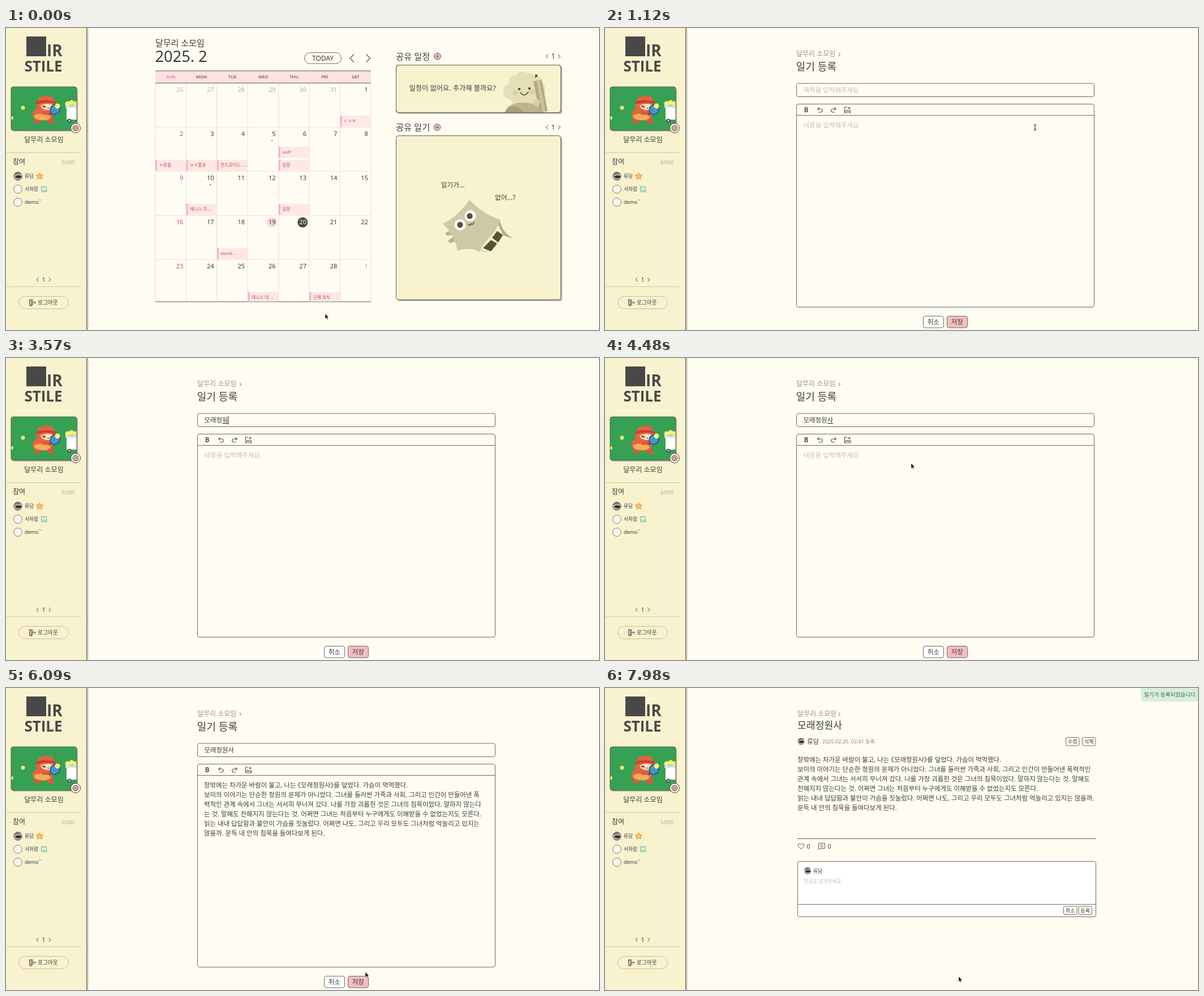
An HTML page for the animation above (8000 ms loop, 1048 by 534 pixels).

```html
<!DOCTYPE html>
<html lang="ko">
<head>
<meta charset="utf-8">
<title>Shared diary</title>
<style>
html, body { margin: 0; width: 100%; height: 100%; overflow: hidden; background: #fffdf2; }
svg { display: block; }
text { font-family: "Noto Sans", "Noto Sans CJK KR", "Noto Sans CJK", sans-serif; fill: #3c3c3c; white-space: pre; }
.logo { font-family: "Open Sans", sans-serif; font-weight: 700; font-stretch: 75%; fill: #484848; }
.mid { text-anchor: middle; }
.end { text-anchor: end; }
.soft { fill: #98958a; }
.hint { fill: #c3c0b6; }
.bold { font-weight: 500; }
.s87 { font-size: 8.7px; }
.s9 { font-size: 9px; }
.s115 { font-size: 11.5px; }
.s12 { font-size: 12px; }
.body text { font-size: 11.45px; font-weight: 500; font-feature-settings: "halt"; }
.line { fill: none; stroke: #5c5b57; stroke-width: 1; }
.thin { fill: none; stroke: #8c8977; stroke-width: 1.1; }
.rule { stroke: #cfc9a9; }
.box { fill: #fffdf2; stroke: #6c6b67; stroke-width: 1; }
.white { fill: #fff; }
.card { fill: #f8f2ce; stroke: #5c5b57; stroke-width: 1; }
.shade { fill: #bdb9a2; }
.grid { fill: none; stroke: #fbdad7; stroke-width: 1.2; }
.red { fill: #c94a45; }
</style>
</head>
<body>
<svg width="1048" height="534" viewBox="0 0 1048 534">
<defs>
  <linearGradient id="edge"><stop stop-color="#a9a699"/><stop offset="1" stop-color="#fffdf2"/></linearGradient>
  <clipPath id="round"><circle r="7.5"/></clipPath>
  <clipPath id="photo"><rect x="9" y="104" width="116" height="77" rx="4"/></clipPath>
  <clipPath id="note"><rect x="690" y="66" width="290" height="83.5" rx="4"/></clipPath>
  <g id="face" clip-path="url(#round)">
    <circle r="8" fill="#b4b2ac"/>
    <path d="M-8 -8H8V-3Q1 -6 -8 -1Z" fill="#77756f"/>
    <ellipse cx="1" cy="1" rx="5.5" ry="2.4" fill="#2f2e2c"/>
    <path d="M-8 4H8V8H-8Z" fill="#9d9b94"/>
  </g>
  <g id="blank"><circle r="7.3" fill="#fff" stroke="#77756a"/><circle r="5.6" fill="#f6f5f1"/></g>
  <g id="plus"><circle r="5.8" fill="#f3bfc3" stroke="#5a4a4a"/><path class="line" d="M-3.2 0H3.2M0 -3.2V3.2"/></g>
  <path id="pager" class="thin" d="M-9 -3.5L-12.5 0L-9 3.5M9 -3.5L12.5 0L9 3.5"/>
</defs>

<rect width="1048" height="534" fill="#fffdf2"/>

<g id="sidebar">
  <rect x="142" width="5" height="534" fill="url(#edge)"/>
  <rect width="142" height="534" fill="#f8f2ce"/>
  <path class="line" d="M142.7 0V534"/>
  <rect x="36" y="15" width="35" height="35" fill="#484848"/>
  <text class="logo" x="72" y="50" font-size="28">IR</text>
  <text class="logo mid" x="66" y="77" font-size="26">STILE</text>

  <rect class="shade" x="11" y="106" width="116" height="77" rx="4"/>
  <g clip-path="url(#photo)">
    <rect x="9" y="104" width="116" height="77" fill="#36a153"/>
    <g fill="#f4f277">
      <circle cx="30" cy="141" r="3.4"/><circle cx="10" cy="159" r="3"/>
      <circle cx="109" cy="134" r="4.5"/><circle cx="116" cy="132" r="4.5"/><circle cx="123" cy="134" r="4.5"/>
    </g>
    <rect x="105" y="137" width="21" height="4" fill="#cfe4ee"/>
    <rect x="107" y="141" width="18" height="21" fill="#fff"/>
    <circle cx="112" cy="164" r="3.6" fill="#4b5560"/><circle cx="112" cy="164" r="1.4" fill="#ddd"/>
    <path d="M53 158L48 168H60L62 160ZM72 160L75 169H86L80 157Z" fill="#e2553b"/>
    <path d="M54 143Q45 149 47 157Q52 164 66 164Q81 164 83 155L80 142Z" fill="#e9613f"/>
    <path d="M50 154Q60 149 76 154L79 158Q76 163 66 163Q54 163 50 158Z" fill="#f5ad58"/>
    <g fill="#e9613f">
      <circle cx="62" cy="127" r="5.5"/><circle cx="70" cy="125" r="5.5"/><circle cx="78" cy="126" r="5.5"/>
      <ellipse cx="72" cy="137" rx="19" ry="11"/>
    </g>
    <path d="M55 130Q70 125 87 130L89 134Q71 129 53 135Z" fill="#c9402f"/>
    <path d="M61 137Q73 131 86 137Q86 145 74 145Q63 145 61 137Z" fill="#fbe3c0"/>
    <path d="M63 138Q68 135 71 140Q66 142 63 138ZM78 140Q81 135 85 138Q83 142 78 140Z" fill="#8a5236"/>
    <path d="M73 141Q75 143.500 77 141" fill="none" stroke="#5a3526"/>
    <path d="M66 151L78 151" stroke="#e2553b" stroke-width="5" stroke-linecap="round"/>
    <path d="M76 153L82 149" stroke="#2b4f7c" stroke-width="2"/>
    <ellipse cx="87" cy="144" rx="9.500" ry="8" transform="rotate(-50 87 144)" fill="#4aa0d0" stroke="#1f5c93" stroke-width="2"/>
    <path d="M81 143L91 150M84 139L94 146M81 149L91 138M86 152L95 142" stroke="#2a6fa6" stroke-width=".7"/>
    <circle cx="91" cy="138" r="4.6" fill="#f4f277"/>
  </g>
  <rect class="line" x="9" y="104" width="116" height="77" rx="4"/>
  <circle cx="123" cy="177" r="8.5" fill="#f8efd4" stroke="#4a4a4a"/>
  <circle cx="123" cy="177" r="4.6" fill="#f3bfc3" stroke="#6a4b4b" stroke-width="1.2"/>
  <circle cx="123" cy="177" r="1.8" fill="#f8efd4" stroke="#6a4b4b"/>

  <text class="s12 mid" x="67" y="202">달무리 소모임</text>
  <path class="rule" d="M1 220.5H132M1 457.5H132"/>
  <text class="s12" x="12" y="241">참여</text>
  <text class="s9 end" x="121.5" y="240.5" style="fill:#b5b093">3/000</text>
  <use href="#face" x="21" y="262"/><circle class="line" cx="21" cy="262" r="7.3" style="stroke:#77756a"/>
  <use href="#blank" x="21" y="285"/><use href="#blank" x="21" y="308"/>
  <g class="bold">
    <text class="s87" x="33" y="265">류담</text>
    <text class="s87" x="33" y="288.3">서하람</text>
    <text class="s9" x="33" y="311">demo``</text>
  </g>
  <path d="M59.5 256L61.5 259.500L65.500 260L62.700 263L63.500 267L59.500 265L55.500 267L56.300 263L53.500 260L57.500 259.500Z" fill="#f3ae55" stroke="#f3ae55" stroke-width="1.500" stroke-linejoin="round"/>
  <circle cx="59.5" cy="262" r="2" fill="#f9d58a"/>
  <path d="M62 280.5L71 280L72.5 289.5L63 290Z" fill="#b5dfbd" stroke="#7fb893" stroke-width=".8"/>
  <circle cx="65.5" cy="284" r="1.5" fill="#fff"/><circle cx="69" cy="284" r="1.5" fill="#fff"/>
  <use href="#pager" x="66.5" y="445"/><text class="mid" x="66.5" y="449" font-size="10.5">1</text>
  <rect x="22.5" y="474.5" width="88" height="22" rx="11" fill="none" stroke="#c3bd9d"/>
  <path d="M41.5 480.5H47V490H41.5ZM41.5 480.5L45 482.5V492L41.5 490Z" fill="#f3bfc3" stroke="#5a4a4a" stroke-width=".9"/>
  <path class="line" d="M46.5 485.5H52M49.7 483L52.2 485.5L49.7 488"/>
  <text x="56" y="489" font-size="9.7">로그아웃</text>
</g>

<g id="calendar">
  <text x="264" y="32" font-size="15">달무리 소모임</text>
  <text x="263.5" y="60" font-size="27.2">2025. 2</text>
  <rect class="box" x="527.5" y="43.5" width="65" height="19.5" rx="9.7"/>
  <text class="s12 mid" x="560" y="57.5">TODAY</text>
  <path class="line" style="stroke-width:1.3" d="M615 46.5L608 53.5L615 60.5M636.5 46.5L643.5 53.5L636.5 60.5"/>
  <g id="days"></g>

  <text x="689" y="56" font-size="15.3">공유 일정</text>
  <use href="#plus" x="762.5" y="50"/>
  <use href="#pager" x="967" y="50"/><text class="mid s12" x="967" y="54.3">1</text>
  <rect class="shade" x="692" y="68" width="291" height="84" rx="4"/>
  <rect class="card" x="689.5" y="65.5" width="291" height="84" rx="4"/>
  <text x="712.5" y="111.3" font-size="12.25">일정이 없어요. 추가해 볼까요?</text>
  <g clip-path="url(#note)">
    <path d="M893 127Q878 124 879 111Q879 101 889 99Q888 83 902 83Q910 72 920 80Q935 77 936 91Q952 93 953 107Q953 122 938 124L934 140H896Z" fill="#e4deb9"/>
    <circle cx="900" cy="114" r="4.5" fill="#d6cfa6"/><circle cx="930" cy="113" r="4.5" fill="#d6cfa6"/>
    <circle cx="907" cy="108" r="2.2" fill="#55513a"/><circle cx="925" cy="107" r="2.2" fill="#55513a"/>
    <path d="M909 114Q916 123 923 113" fill="none" stroke="#55513a" stroke-width="1.6" stroke-linecap="round"/>
    <path d="M881 150Q888 131 915 132Q940 132 950 150Z" fill="#bcb48b"/>
    <path d="M886 141Q904 133 915 150H882Z" fill="#a79f76"/>
    <path d="M932 94L947 91L957 147L943 150Z" fill="#b3ab82"/>
    <path d="M938 93L943 92L953 148L948 149Z" fill="#cbc49c"/>
    <path d="M932 94L937 82L947 91Z" fill="#e4deb9"/>
    <path d="M934.5 88L936 81L940.5 85Z" fill="#4d4a38"/>
    <path d="M930 133Q931 125 940 126Q947 129 942 136Q934 139 930 133Z" fill="#d6cfa6"/>
  </g>
  <rect class="line" x="689.5" y="65.5" width="291" height="84" rx="4"/>

  <text x="689" y="181" font-size="15.3">공유 일기</text>
  <use href="#plus" x="762" y="175.5"/>
  <use href="#pager" x="967" y="175.5"/><text class="mid s12" x="967" y="179.8">1</text>
  <rect class="shade" x="692" y="193" width="291" height="290" rx="4"/>
  <rect class="card" x="689.5" y="190.5" width="291" height="290" rx="4"/>
  <g class="bold" font-size="11.8"><text x="768.5" y="282">일기가...</text><text x="864" y="304">없어...?</text></g>
  <path d="M790 357L776 362L779 367L788 366M793 367L781 376L785 381L796 376" fill="#bcb48b"/>
  <path d="M872 338Q877 363 897 372Q881 370 867 358" fill="#b5ad85"/>
  <path d="M866 340L879 366L849 396L832 392Z" fill="#f3edc8" stroke="#c9c29b"/>
  <path d="M868 359L878 366L870 379L859 371ZM857 375L868 381L857 395L843 389Z" fill="#55513a"/>
  <path d="M819 304Q842 328 873 339Q868 358 854 371Q842 383 837 396Q821 386 798 394Q793 366 772 346Q799 333 819 304Z" fill="#d0c9a5"/>
  <g fill="#fff"><circle cx="820.5" cy="332" r="10"/><circle cx="802.5" cy="348" r="10"/></g>
  <g fill="#55513a"><circle cx="819.5" cy="332.5" r="5.2"/><circle cx="802.5" cy="348" r="5.2"/></g>
  <path d="M817 347Q819 351 822 346Q826 349 827 343" fill="none" stroke="#55513a" stroke-width="1.6" stroke-linecap="round"/>
</g>

<g id="form">
  <text class="s12 soft" x="338" y="50">달무리 소모임</text>
  <path class="thin" d="M413 43.5L415.5 46.5L413 49.5"/>
  <text x="337.5" y="75" font-size="18.2">일기 등록</text>
  <rect class="box" x="338.5" y="98" width="526" height="23.5" rx="3.5"/>
  <text id="titleHint" class="s115 hint" x="350.5" y="114">제목을 입력해주세요</text>
  <text id="title" class="bold" x="350.5" y="114" font-size="11.45"></text>
  <rect class="box" x="338.5" y="134.5" width="526" height="359" rx="3.5"/>
  <path class="box" d="M338.5 154.5H864.5"/>
  <text class="mid" x="355.5" y="149" font-size="11.5" font-weight="700" style="fill:#555">B</text>
  <g class="line" style="stroke-width:1.2">
    <path d="M378.5 140.5L375.8 143L378.5 145.5M375.8 143H381.5Q384.3 143.5 384.3 146Q384 149 381 149H377.5"/>
    <path d="M405.5 140.5L408.2 143L405.5 145.5M408.2 143H402.5Q399.7 143.5 399.7 146Q400 149 403 149H406.5"/>
    <path d="M428.5 140H423.5V150H433.5V145M431.5 139.5V144M429.3 141.7H433.8M424.5 148.5L427 145.5L429 147.5L430.5 146L432.5 148.5"/>
  </g>
  <text id="bodyHint" class="s115 hint" x="350.5" y="176">내용을 입력해주세요</text>
  <g id="draft" class="body"></g>
  <path id="caret" stroke="#333"/>
  <rect class="box white" x="562.5" y="509.5" width="36" height="20.5" rx="3.5"/>
  <rect class="box" x="604.5" y="509.5" width="36" height="20.5" rx="3.5" style="fill:#f4bdc1"/>
  <g class="mid s115 bold"><text x="580.3" y="524">취소</text><text x="622.3" y="524">저장</text></g>
</g>

<g id="detail">
  <text class="s12 soft" x="340" y="50">달무리 소모임</text>
  <path class="thin" d="M413 43.5L415.5 46.5L413 49.5"/>
  <text class="bold" x="340" y="71.5" font-size="17.2">모래정원사</text>
  <use href="#face" transform="translate(346.5 94.5) scale(.83)"/>
  <text class="s115 bold" x="357" y="98.5">류담</text>
  <text class="s9" x="384" y="98" style="fill:#8b887e">2025.02.20. 02:41 등록</text>
  <g id="post" class="body"></g>
  <path class="line" d="M340 266.5H867.5"/>
  <path class="line" d="M346.5 284.5Q341 281 341 278Q341 275.3 343.5 275.3Q345.5 275.3 346.5 277.3Q347.5 275.3 349.5 275.3Q352 275.3 352 278Q352 281 346.5 284.5Z"/>
  <path class="line" d="M377.5 274.5H388.5V283.5H380L377.5 286ZM380 277.5H386M380 280.5H386"/>
  <g class="bold" font-size="10.5"><text x="356.5" y="283.5">0</text><text x="393.5" y="283.5">0</text></g>
  <rect class="box white" x="340.5" y="306.5" width="527" height="98" rx="3"/>
  <path class="box" d="M340.5 382.5H867.5"/>
  <use href="#face" transform="translate(358 323.3) scale(.83)"/>
  <text class="s87 bold" x="368" y="326.5">류담</text>
  <text class="s87 hint" x="351" y="344.5">댓글을 남겨보세요.</text>
  <g id="buttons"></g>
</g>

<g id="toast">
  <path d="M952 0H1060V24H952Q947 24 947 19V5Q947 0 952 0Z" fill="#d8eedb"/>
  <text x="952.5" y="15.3" font-size="9.6" style="fill:#3c6650">일기가 등록되었습니다.</text>
</g>

<path id="arrow" d="M0 0V9.5L2.2 7.6L3.6 10.8L5 10.2L3.6 7.1H6.4Z" fill="#000" stroke="#fff" stroke-width=".6"/>
<path id="beam" d="M-2.5 -5Q0 -5 0 -3V3Q0 5 -2.5 5M2.5 -5Q0 -5 0 -3M0 3Q0 5 2.5 5M-1 1.5H1" fill="none" stroke="#222"/>
</svg>

<script>
const $ = id => document.getElementById(id);
const text = (x, y, str, attrs = '') => `<text x="${x}" y="${y}" ${attrs}>${str}</text>`;
const rect = (x, y, w, h, fill) => `<rect x="${x}" y="${y}" width="${w}" height="${h}" fill="${fill}"/>`;
const circle = (x, y, r, fill) => `<circle cx="${x}" cy="${y}" r="${r}" fill="${fill}"/>`;

function dayColor(n, col) {
  if (n === 20) return '#fff';
  if (n < 1 && col === 0) return '#e8aaa5';
  if (n < 1 || n > 28) return '#b3b0a7';
  return col ? '#3c3c3c' : '#c94a45';
}

function buildCalendar() {
  const left = 264, top = 97.5, colW = 381 / 7, rowH = 78, bottom = 484;
  const colX = c => left + c * colW;
  let out = rect(left, 76, 381, 21, '#fce2e1');
  for (let c = 0; c <= 7; c++) out += `<path class="grid" d="M${colX(c)} ${top}V${bottom}"/>`;
  for (let r = 1; r < 5; r++) out += `<path class="grid" d="M${left} ${top + r * rowH}H645"/>`;
  out += `<path class="line" d="M${left} 75.8H645M${left} 97.3H645M${left} ${bottom}H645"/>`;
  'SUN MON TUE WED THU FRI SAT'.split(' ').forEach((day, c) => {
    out += text(colX(c + .5), 89.2, day, `class="mid" font-size="7.9" ${c ? '' : 'style="fill:#e2574d"'}`);
  });
  out += circle(470, 343.7, 9, '#fad8d5') + circle(524.3, 343.7, 9, '#444');
  out += circle(470, 199, 1.3, '#e0686a') + circle(361, 277.3, 1.3, '#e0686a');
  for (let i = 0; i < 35; i++) {
    const c = i % 7, r = Math.floor(i / 7), n = i - 5;
    const day = n < 1 ? n + 31 : n > 28 ? n - 28 : n;
    out += text(colX(c + 1) - 5.2, top + r * rowH + 15.6, day,
      `class="end" font-size="11" style="fill:${dayColor(n, c)}"`);
  }
  const events = [
    [6, 0, 'ㄴㅇㄹ'], [0, 1, 'ㅇ류율'], [1, 1, 'ㅠㅈ률츄'], [2, 1, '안드로이드 ...'], [4, 1, 'asdf', -23], [4, 1, '일정'],
    [1, 2, '테니스 치 ...'], [4, 2, '일정'], [2, 3, 'dscsd ...'], [3, 4, '테니스 대 ...'], [5, 4, '단체 회식']
  ];
  for (const [c, r, name, dy = 0] of events) {
    const x = colX(c), y = top + r * rowH + 57.5 + dy, h = r === 4 ? 16.5 : 19.5;
    out += rect(x, y, colW - .5, h, '#fce8e4') + rect(x, y, 3, h, '#f2b8bb');
    out += text(x + 6.5, y + 12.4, name, 'class="red bold" font-size="7.7"');
  }
  $('days').innerHTML = out;
}

// "|" breaks a line in the editor, "/" in the finished post, "\n" in both.
const entry = `창밖에는 차가운 바람이 불고, 나는 《모래정원사》를 덮었다. 가슴이 먹먹했다.
보미의 이야기는 단순한 정원의 문제가 아니었다. 그녀를 둘러싼 가족과 사회, 그리고 인간이 만들어낸 폭|력적인/ 관계 속에서 그녀는 서서히 무너져 갔다. 나를 가장 괴롭힌 것은 그녀의 침묵이었다. 말하지 않는다|는 것. 말해도/ 전해지지 않는다는 것. 어쩌면 그녀는 처음부터 누구에게도 이해받을 수 없었는지도 모른다.
읽는 내내 답답함과 불안이 가슴을 짓눌렀다. 어쩌면 나도, 그리고 우리 모두도 그녀처럼 억눌리고 있지는| 않을까./ 문득 내 안의 침묵을 들여다보게 된다.`;

const layout = (x, y, keep, drop) => entry.replaceAll(drop, '').split(new RegExp(`[\\n${keep}]`))
  .map((line, i) => text(x, y + i * 17, line.trim())).join('');

buildCalendar();
$('draft').innerHTML = layout(350, 176, '|', '/');
$('post').innerHTML = layout(340, 131, '/', '|');
$('buttons').innerHTML = [[814.5, 87.5, '수정'], [843.5, 87.5, '삭제'], [810.5, 386, '취소'], [837, 386, '등록']]
  .map(([x, y, label]) => `<rect class="box" x="${x}" y="${y}" width="23.5" height="14.5" rx="2.5"/>`
    + text(x + 11.8, y + 10.6, label, 'class="mid s9 bold"')).join('');

const typing = [
  [2730, 'ㅁ'], [2800, '모'], [2870, '몰'], [3010, '모래'], [3150, '모랮'], [3220, '모래저'], [3290, '모래정'],
  [3430, '모래정ㅇ'], [3500, '모래정우'], [3570, '모래정워'], [3640, '모래정원'], [3780, '모래정원사']
];
const path = [
  [0, 564, 505], [490, 735, 215], [630, 735, 215], [1050, 759, 175], [1120, 760, 176], [1190, 760, 176],
  [1680, 530, 109.5], [4200, 530, 109.5], [4480, 541, 186], [4620, 553, 200], [4760, 553, 200], [4970, 537, 204],
  [5390, 537, 204], [5810, 690, 430], [6090, 635, 502], [6230, 639, 501], [6720, 625, 510], [8000, 625, 510]
];

function pointer(t) {
  const i = path.findIndex(p => p[0] > t);
  const [t0, x0, y0] = path[i - 1], [t1, x1, y1] = path[i];
  const u = (t - t0) / (t1 - t0), k = u * u * (3 - 2 * u);
  return [x0 + (x1 - x0) * k, y0 + (y1 - y0) * k];
}

const show = (id, on) => { $(id).style.display = on ? '' : 'none'; };
const within = (t, a, b) => t >= a && t < b;

function drawTitle(t) {
  const step = typing.filter(s => s[0] <= t).pop();
  const str = step ? step[1] : '';
  $('title').innerHTML = str && t < 4830
    ? `${str.slice(0, -1)}<tspan text-decoration="underline">${str.slice(-1)}</tspan>` : str;
}

function drawCaret(t) {
  let spot = null;
  if (within(t, 1680, 2240)) spot = [351.5, 102];
  else if (within(t, 2730, 4200)) spot = [351 + $('title').getComputedTextLength(), 102];
  else if (within(t, 4900, 5180)) spot = [351.5, 164];
  else if (within(t, 5180, 5600)) spot = [351 + $('draft').lastChild.getComputedTextLength(), 249];
  show('caret', spot);
  if (spot) $('caret').setAttribute('d', `M${spot[0]} ${spot[1]}v16`);
}

let drawn = -1;
function draw(now) {
  const t = Math.floor(now % 8000 / 70) * 70;
  if (t === drawn) return;
  drawn = t;
  const form = within(t, 1120, 7630);
  show('calendar', t < 1120);
  show('form', form);
  show('detail', t >= 7630);
  show('toast', t >= 7490);
  $('toast').setAttribute('transform', `translate(${t < 7630 ? -5 : 0})`);
  show('titleHint', t < 2730);
  show('bodyHint', t < 5180);
  show('draft', t >= 5180);
  if (form) {
    drawTitle(t);
    drawCaret(t);
  }
  const beam = within(t, 1120, 2730);
  show('beam', beam);
  show('arrow', t < 1120 || t >= 4270);
  $(beam ? 'beam' : 'arrow').setAttribute('transform', `translate(${pointer(t)})`);
}

let start = null;
function tick(now) {
  start ??= now;
  draw(Math.max(0, now - start));
  requestAnimationFrame(tick);
}
draw(0);
requestAnimationFrame(tick);
</script>
</body>
</html>
```
